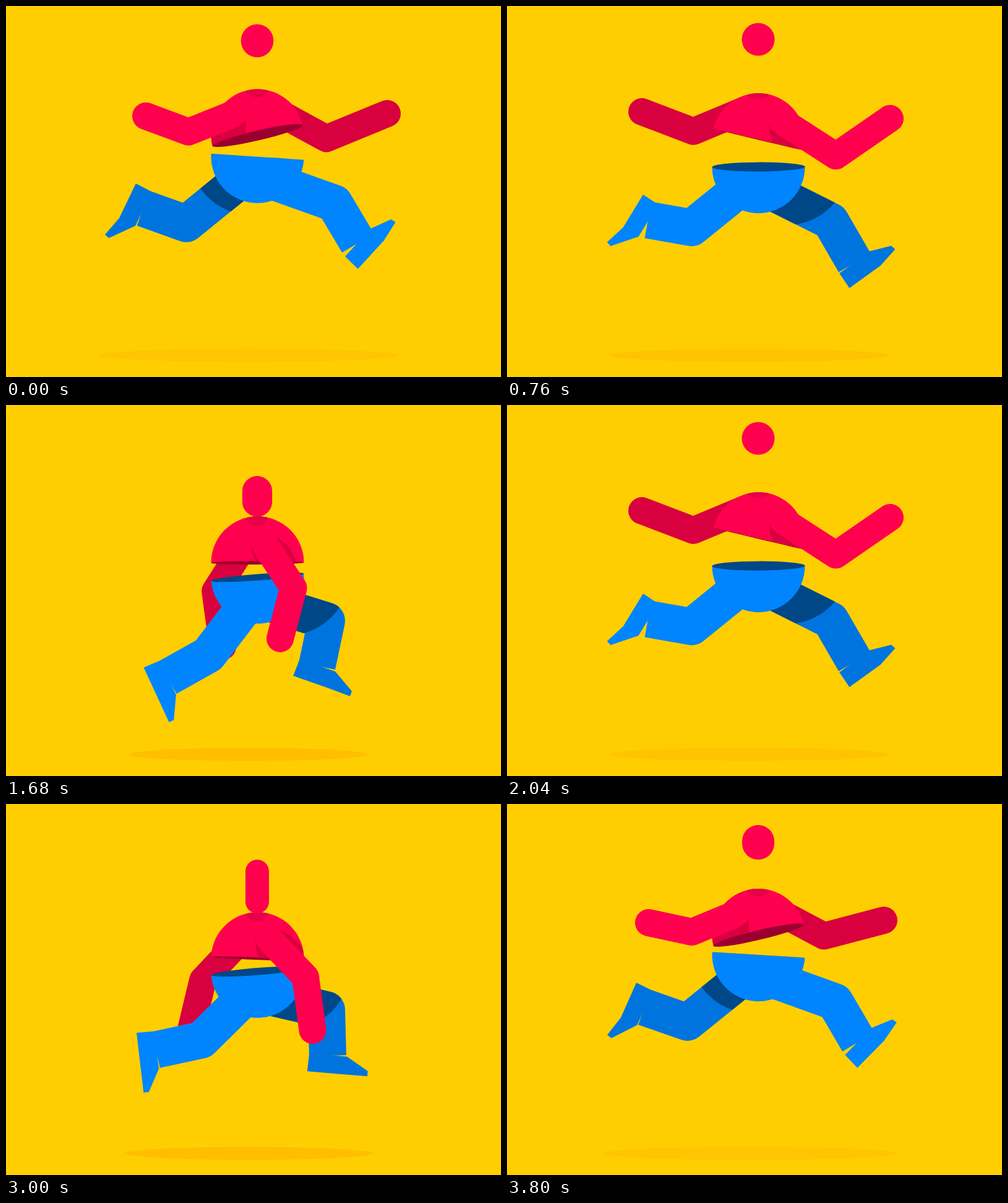
An HTML page with a canvas that plays this animation: 800 px wide and 600 px high, repeating every 3840 ms.

```html
<!DOCTYPE html>
<html lang="en">
<head>
<meta charset="utf-8">
<title>Run cycle</title>
<style>
  html, body { margin: 0; width: 100%; height: 100%; overflow: hidden; background: #ffce00; }
  canvas { display: block; width: 800px; height: 600px; }
</style>
</head>
<body>
<canvas id="stage" width="800" height="600"></canvas>
<script>
const ctx = document.getElementById('stage').getContext('2d');
const TAU = Math.PI * 2, RAD = Math.PI / 180;
const CYCLE = 1280, STEP = CYCLE / 2, TICK = 40, CX = 406.5, R = 75;
const C = {
  bg: '#ffce00', red: '#ff004f', redDark: '#d9003f', hem: '#99002f', collar: '#e60047',
  blue: '#0085ff', blueDark: '#0074de', navy: '#004787'
};

const wave = (t, peak, period) => Math.cos(TAU * (t - peak) / period);
const clamp = (v, a, b) => Math.min(b, Math.max(a, v));

// Periodic smooth curve through keys [time, ...values]
function track(keys, period) {
  const n = keys.length;
  const at = i => {
    const k = keys[(i + n) % n], turn = Math.floor(i / n) * period;
    return [k[0] + turn, ...k.slice(1)];
  };
  const slope = (a, b, c) => (b[c] - a[c]) / (b[0] - a[0]);
  const tangent = (i, c) => {
    const a = at(i - 1), b = at(i), d = at(i + 1);
    const s0 = slope(a, b, c), s1 = slope(b, d, c);
    if (s0 * s1 <= 0) return 0;
    const h0 = b[0] - a[0], h1 = d[0] - b[0];
    const m = (s0 * h1 + s1 * h0) / (h0 + h1);
    return Math.sign(m) * Math.min(Math.abs(m), 3 * Math.abs(s0), 3 * Math.abs(s1));
  };
  return time => {
    const t = (time % period + period) % period;
    let i = n - 1;
    while (i >= 0 && at(i)[0] > t) i--;
    const a = at(i), b = at(i + 1), h = b[0] - a[0], u = (t - a[0]) / h;
    const out = [];
    for (let c = 1; c < a.length; c++) {
      out.push((1 + 2 * u) * (1 - u) ** 2 * a[c] + u * (1 - u) ** 2 * h * tangent(i, c)
        + u * u * (3 - 2 * u) * b[c] + u * u * (u - 1) * h * tangent(i + 1, c));
    }
    return out;
  };
}

// Second half of the cycle mirrors the first
const mirrored = keys => track([...keys, ...keys.map(([t, v]) => [t + STEP, -v])], CYCLE);

const hipY = t => 265.5 - 22 * wave(t, -15, STEP);
const chest = track([[0, 209.5], [120, 216], [350, 258], [440, 250], [600, 212]], STEP);
const chestY = t => chest(t)[0];
const chestTilt = mirrored([[0, -13], [120, -13.5], [440, 2.3], [600, 13.3]]);
const hipTilt = mirrored([[0, 3.8], [120, 0.2], [440, -4.5], [600, -3.5]]);
// centre y, width, height
const head = track([
  [0, 56.2, 52.5, 53.5], [60, 53, 53, 53], [120, 54, 53, 53], [210, 74, 48, 62],
  [300, 131, 39, 82], [370, 153, 55, 52], [440, 133.5, 38, 87], [600, 62, 52, 56]
], STEP);

// Keys hold root, joint and end points; they are blended as angles and lengths.
// Missing poses come from the opposite limb, half a cycle away.
function limb(own, other, baseY) {
  const lent = other.filter(k => k[0] !== 120 && k[0] !== 760)
    .map(k => [k[0], k, (k[0] + STEP) % CYCLE]);
  const poses = [...own.map(k => [k[0], k, k[0]]), ...lent].map(([src, k, t]) => {
    const [, ax, ay, bx, by, cx, cy, ...rest] = k;
    return [t, ax, ay - baseY(src),
      Math.atan2(by - ay, bx - ax), Math.hypot(bx - ax, by - ay),
      Math.atan2(cy - by, cx - bx), Math.hypot(cx - bx, cy - by), ...rest];
  }).sort((p, q) => p[0] - q[0]);
  for (let i = 1; i < poses.length; i++) {
    for (const c of [3, 5]) {
      poses[i][c] -= TAU * Math.round((poses[i][c] - poses[i - 1][c]) / TAU);
    }
  }
  const curve = track(poses, CYCLE);
  return t => {
    const [x, y, a1, l1, a2, l2, foot, toe] = curve(t);
    const a = [x, y + baseY(t)];
    const b = [a[0] + l1 * Math.cos(a1), a[1] + l1 * Math.sin(a1)];
    const c = [b[0] + l2 * Math.cos(a2), b[1] + l2 * Math.sin(a2)];
    return { a, b, c, dir: a1, foot, toe };
  };
}

// time, shoulder, elbow, hand
const nearArmKeys = [
  [0, 374, 172, 295, 203.6, 226, 178],
  [120, 369, 183, 290.6, 215.9, 225, 171],
  [440, 420, 213, 484, 280, 495.5, 366],
  [760, 439, 182.6, 531.5, 242.5, 619, 182],
  [1240, 377.5, 174.5, 299, 207, 229, 192]
];
const farArmKeys = [
  [0, 443, 173.6, 517.6, 214.3, 616, 174],
  [120, 446.6, 181.3, 522.3, 219.9, 619, 168],
  [440, 383.4, 216, 318, 285, 298, 369],
  [760, 380, 170, 301.3, 202.7, 218, 171],
  [1240, 437.4, 173.6, 512.4, 213.5, 609, 188]
];
// time, hip, knee, ankle, foot angle, toe bend
const nearLegKeys = [
  [0, 399, 272, 530.7, 319.1, 569, 383.5, -47.5, -10],
  [120, 396.7, 285, 525.6, 339.8, 568.5, 403, -39, -12.7],
  [280, 402, 320, 420, 459, 419, 536, 0, 0],
  [440, 401, 297.5, 315.7, 381.6, 242.4, 397.5, 83.3, 0],
  [760, 391.8, 283, 298.5, 358.5, 227.8, 346, 121.3, 16],
  [1240, 398.5, 272.5, 530, 320, 568, 385, -45.6, -10]
];
const farLegKeys = [
  [0, 384.5, 276.5, 291.5, 352, 221.7, 327.1, 115.7, 15],
  [120, 398, 292, 296, 365.3, 225.4, 342.7, 119.1, 15],
  [280, 400, 310, 468, 430, 402, 468, 65, 5],
  [440, 392, 304, 518, 333, 520, 407, 4.7, 0],
  [760, 397.8, 285.3, 523, 348, 562, 415.5, -36, -12],
  [1240, 385, 277.5, 291.7, 353, 222, 328.7, 114, 14]
];
const nearArm = limb(nearArmKeys, farArmKeys, chestY);
const farArm = limb(farArmKeys, nearArmKeys, chestY);
const nearLeg = limb(nearLegKeys, farLegKeys, hipY);
const farLeg = limb(farLegKeys, nearLegKeys, hipY);

function bone({ a, b, c }, width, cap, color) {
  ctx.beginPath();
  ctx.moveTo(...a);
  ctx.lineTo(...b);
  ctx.lineTo(...c);
  ctx.lineWidth = width;
  ctx.lineCap = cap;
  ctx.lineJoin = 'round';
  ctx.strokeStyle = color;
  ctx.stroke();
}

function ellipse(x, y, rx, ry, color) {
  ctx.beginPath();
  ctx.ellipse(x, y, rx, Math.max(0, ry), 0, 0, TAU);
  ctx.fillStyle = color;
  ctx.fill();
}

function drawLeg(leg, color) {
  bone(leg, 60, 'butt', color);
  const bend = leg.toe * RAD, co = Math.cos(bend), si = Math.sin(bend);
  const toe = (x, y) => [31 + x * co - y * si, 28 + x * si + y * co];
  ctx.save();
  ctx.translate(...leg.c);
  ctx.rotate(leg.foot * RAD);
  ctx.beginPath();
  [[-30, -1], [-31, 28], [31, 28], toe(35.5, 0), toe(35.5, -8.5), [31, -1]]
    .forEach(p => ctx.lineTo(...p));
  ctx.fillStyle = color;
  ctx.fill();
  ctx.restore();
}

// Shadow of the pelvis on the far thigh
function shadeThigh({ a, b, dir }, y) {
  const nx = -Math.sin(dir) * 30, ny = Math.cos(dir) * 30;
  ctx.save();
  ctx.beginPath();
  ctx.moveTo(a[0] - nx, a[1] - ny);
  ctx.lineTo(b[0] - nx, b[1] - ny);
  ctx.arc(b[0], b[1], 30, dir - Math.PI / 2, dir + Math.PI / 2);
  ctx.lineTo(a[0] + nx, a[1] + ny);
  ctx.clip();
  ellipse(CX + 16 + 34 * Math.cos(dir), y - 6, 100, 100, C.navy);
  ctx.restore();
}

function drawPelvis(t) {
  ctx.save();
  ctx.translate(CX, hipY(t));
  ctx.rotate(hipTilt(t)[0] * RAD);
  ctx.beginPath();
  ctx.arc(0, 0, R, 0, Math.PI);
  ctx.fillStyle = C.blue;
  ctx.fill();
  ellipse(0, 0, R, 4 - 4 * wave(t, 20, CYCLE), C.navy);
  ctx.restore();
}

function chestPath(t, hem) {
  const y = chestY(t), tilt = chestTilt(t)[0] * RAD;
  ctx.beginPath();
  ctx.arc(CX, y, R, Math.PI + tilt, TAU + tilt);
  if (hem) ctx.ellipse(CX, y, R, hem, tilt, 0, Math.PI, true);
  ctx.closePath();
}

function drawChest(t, hem) {
  const y = chestY(t), top = y - R;
  ctx.save();
  chestPath(t, 0);
  ctx.fillStyle = C.red;
  ctx.fill();
  ctx.clip();
  const depth = 12 + 4 * wave(t, 260, CYCLE);
  ellipse(CX - 1, top + 1, 18, depth - 1, C.collar);
  ctx.restore();
  ctx.save();
  ctx.translate(CX, y);
  ctx.rotate(chestTilt(t)[0] * RAD);
  ellipse(0, 0, R, hem, C.hem);
  ctx.restore();
}

function drawHead(t) {
  const [y, w, h] = head(t);
  ctx.beginPath();
  ctx.roundRect(406 - w / 2, y - h / 2, w, h, Math.min(w, h) / 2);
  ctx.fillStyle = C.red;
  ctx.fill();
}

// Folds on the shirt around the near arm
function shadeArm({ a, b, dir }, t, hem) {
  const ux = Math.cos(dir), uy = Math.sin(dir), side = ux < 0 ? -1 : 1;
  const nx = -uy * side, ny = ux * side;
  const pt = (along, out, o = a) => [o[0] + ux * along + nx * out, o[1] + uy * along + ny * out];
  const tip = pt(-8, 16), lift = side > 0 ? 6 : 0;
  ctx.save();
  chestPath(t, hem);
  ctx.clip();
  ctx.fillStyle = C.redDark;
  ctx.globalAlpha = clamp(Math.abs(ux) * 4, 0, 1);
  ctx.beginPath();
  ctx.moveTo(...tip);
  ctx.quadraticCurveTo(tip[0], tip[1] + 16, tip[0] + lift, tip[1] + 30);
  ctx.lineTo(tip[0] + lift * 2, tip[1] + 70);
  ctx.lineTo(CX + side * 80, chestY(t) + 60);
  ctx.lineTo(...pt(0, 22, b));
  ctx.lineTo(...pt(20, 22));
  ctx.quadraticCurveTo(...pt(0, 22), ...tip);
  ctx.fill();
  const bulge = 16 * clamp((uy - 0.56) / 0.14, 0, 1);
  ctx.beginPath();
  ctx.moveTo(...pt(8, -22));
  ctx.quadraticCurveTo(...pt(40, -22 - bulge), ...pt(72, -22));
  ctx.fill();
  ctx.restore();
}

function draw(t) {
  const hem = 4 + 4 * wave(t, 20, CYCLE), swing = wave(t, 10, STEP);
  ctx.fillStyle = C.bg;
  ctx.fillRect(0, 0, 800, 600);
  ellipse(392, 565, 214 + 27.5 * swing, 10.5, `rgb(255,${Math.round(193 + 4 * swing)},0)`);

  const thigh = farLeg(t), arm = nearArm(t);
  bone(farArm(t), 44, 'round', C.redDark);
  drawLeg(thigh, C.blueDark);
  shadeThigh(thigh, hipY(t));
  drawLeg(nearLeg(t), C.blue);
  drawPelvis(t);
  drawChest(t, hem);
  drawHead(t);
  bone(arm, 44, 'round', C.red);
  shadeArm(arm, t, hem);
}

let start = null;
function frame(now) {
  if (start === null) start = now;
  draw(Math.round((now - start) / TICK) * TICK % CYCLE);
  requestAnimationFrame(frame);
}
draw(0);
requestAnimationFrame(frame);
</script>
</body>
</html>
```
